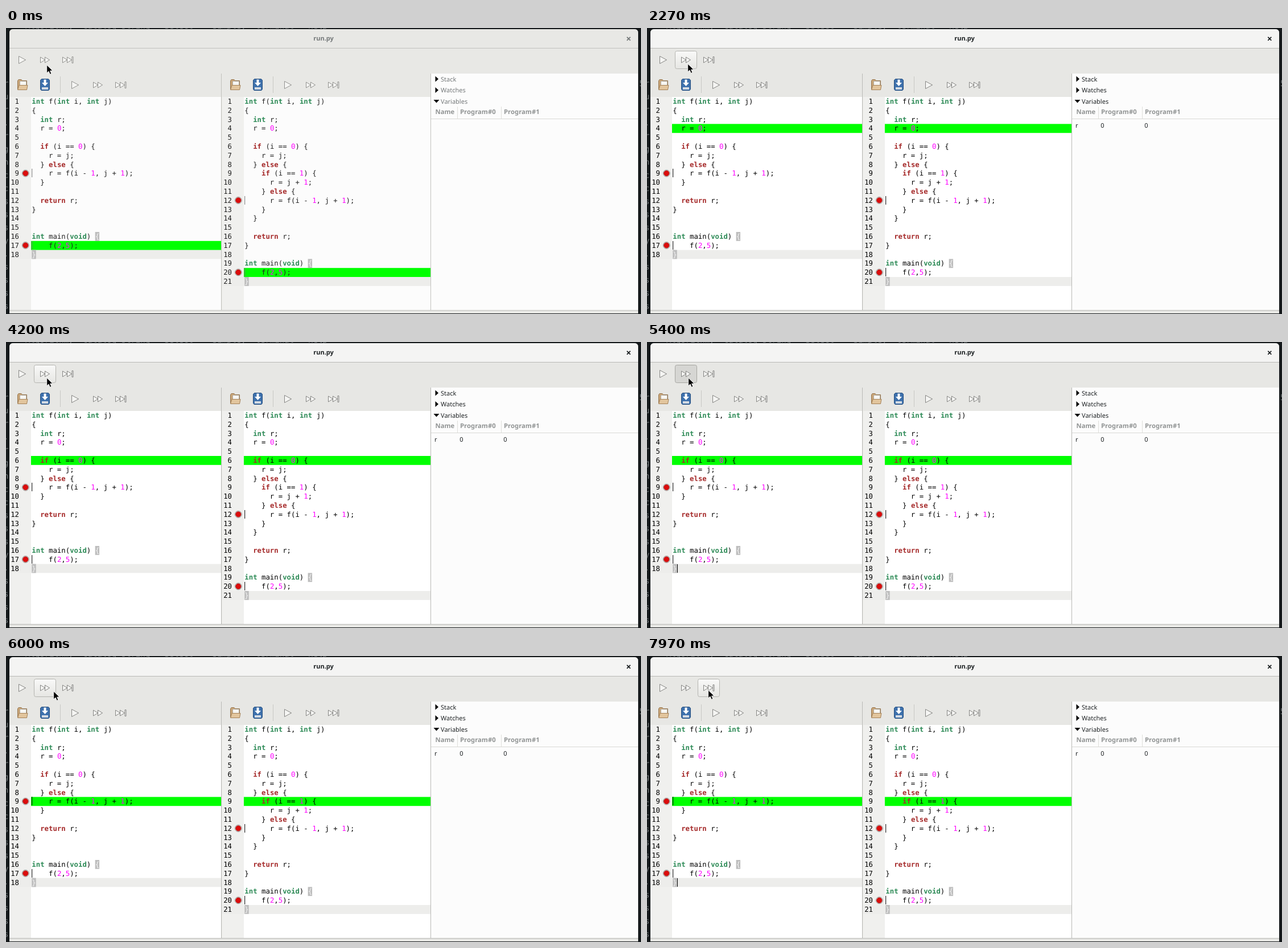
Animation, 1116 px wide and 502 px high, one loop 8000 ms. Source, as an HTML page:

```html
<!DOCTYPE html>
<html lang="en">
<head>
<meta charset="utf-8">
<title>Debugger</title>
<style>
  html, body { margin: 0; width: 100%; height: 100%; overflow: hidden; background: #15191b; }
  svg {
    display: block; width: 1116px; height: 502px;
    --bg: #e7e7e4; --bar: #f4f4f3; --edge: #b9b9b6; --base: #fff; --side: #fcfcfc;
    --fg: #1e2224; --code: #000; --mark: #000; --icon: #858583;
  }
  svg.idle {
    --bg: #e8e8e5; --bar: #e8e8e5; --edge: #c2c2be; --base: #fcfcfc; --side: #fcfcfc;
    --fg: #75797a; --code: #222; --mark: #777; --icon: #92928f;
  }
  text { white-space: pre; text-rendering: geometricPrecision; }
  .ui { font: 11px "Noto Sans", "Open Sans", sans-serif; fill: var(--fg); }
  .b { font-weight: bold; }
  .head { font-size: 11.3px; font-weight: bold; fill: #929595; }
  .code { font: 12.33px "DejaVu Sans Mono", monospace; fill: var(--code); }
  .type { fill: #2e8b57; font-weight: bold; }
  .word { fill: #a52a2a; font-weight: bold; }
  .num { fill: #f0f; }
  .pair { fill: #f4f4f4; }
  .icon { fill: #f5f5f3; stroke: var(--icon); stroke-linejoin: round; }
  .back { font: 14px "DejaVu Sans Mono", monospace; fill: #6e7476; }
</style>
</head>
<body>
<svg id="stage" viewBox="0 0 1116 502"></svg>
<script>
const LOOP = 8000, ROW = 15.8, TOP = 121, CHAR = 7.423, SHIFT = 374;
const stage = document.getElementById('stage');

function add(parent, tag, attrs, text) {
  const el = document.createElementNS('http://www.w3.org/2000/svg', tag);
  for (const key in attrs) el.setAttribute(key, attrs[key]);
  if (text !== undefined) el.textContent = text;
  parent.appendChild(el);
  return el;
}
const rect = (p, x, y, width, height, fill, more) =>
  add(p, 'rect', { x, y, width, height, fill, ...more });
const path = (p, d, attrs) => add(p, 'path', { d, ...attrs });
const label = (p, x, y, text, cls = '', more) =>
  add(p, 'text', { x, y, class: 'ui ' + cls, ...more }, text);
const rowTop = n => TOP + ROW * (n - 1);

// Desktop showing around the window
rect(stage, 0, 0, 1116, 502, '#15191b');
label(stage, 34, 1, 'Algorithm,  catalog string   Select    Simple,  terminal   Help', '', { class: 'back' });
[...'rur.rgnccsssy.sssss'].forEach((c, i) =>
  label(stage, -4, 102 + i * 23, c, '', { class: 'back' }));
label(stage, 1113, 102, '5', '', { class: 'back' });

// Window frame
path(stage, 'M6 501V9Q6 2 13 2H1104Q1111 2 1111 9V501Z', { fill: 'var(--bg)' });
path(stage, 'M6 35V9Q6 2 13 2H1104Q1111 2 1111 9V35Z', { fill: 'var(--bar)' });
rect(stage, 6, 35, 1105, 1, 'var(--edge)');
label(stage, 558, 22, 'run.py', 'b', { 'text-anchor': 'middle' });
path(stage, 'M1091.3 15.8l6 6m0-6l-6 6', { stroke: 'var(--fg)', 'stroke-width': 1.8 });

// Tool buttons
const defs = add(stage, 'defs', {});
const shine = add(defs, 'linearGradient', { id: 'shine', x2: 0, y2: 1 });
add(shine, 'stop', { offset: 0, 'stop-color': '#f9f9f8' });
add(shine, 'stop', { offset: 1, 'stop-color': '#e6e6e3' });
const button = rect(stage, 49.5, 40.5, 38, 31, 'none', { rx: 3 });

function runIcons(p, x, y) {
  const g = add(p, 'g', { class: 'icon', transform: `translate(${x} ${y})` });
  path(g, 'M-5.5-6.5L6.5 0L-5.5 6.5Z');
  path(g, 'M32.5-5L40.5 0L32.5 5ZM40.5-5L48.5 0L40.5 5Z');
  path(g, 'M71.5-5L79.5 0L71.5 5ZM79.5-5L87.5 0L79.5 5ZM88-5.5H90V5.5H88Z');
}
runIcons(stage, 28, 56);

function fileIcons(p) {
  path(p, 'M20.5 107.5V92.5L22 90.5H27L28.5 92.5H36.5V107.5Z', { fill: '#c9a578', stroke: '#96754d' });
  rect(p, 24.5, 93.5, 11, 9, '#f7f6f2', { stroke: '#b5b0a6' });
  path(p, 'M20.5 108.5L23 100.5H38L36.5 108.5Z', { fill: '#e2c59d', stroke: '#a58259' });
  path(p, 'M60.5 91.5L62.5 89.5H74.5L76.5 91.5V107.5L75 109.5H62L60.5 107.5Z',
    { fill: '#3e71ad', stroke: '#28507f' });
  rect(p, 63, 104, 11, 4, '#d4dbe3');
  path(p, 'M66.5 90.5H70.5V96H74L68.5 102L63 96H66.5Z', { fill: '#fff' });
  rect(p, 95, 85, 1, 29, '#c8c8c4');
}

// Editors
const STYLES = [
  ['type', /^(int|void)$/], ['word', /^(if|else|return)$/], ['num', /^\d+$/]
];

function codeLine(p, n, line, pair) {
  const row = add(p, 'text', { x: 45.3, y: rowTop(n) + 12, class: 'code' });
  let col = 0;
  for (const part of line.match(/\w+|[{}]|[^\w{}]+/g) || []) {
    const style = STYLES.find(([, re]) => re.test(part));
    const cls = pair === col ? 'pair' : style ? style[0] : '';
    add(row, 'tspan', { class: cls }, part);
    col += part.length;
  }
}

function editor(x, width, source, stops, open) {
  const g = add(stage, 'g', { transform: `translate(${x} 0)` });
  const lines = source.split('\n'), last = lines.length;
  const wide = width - 38;
  fileIcons(g);
  runIcons(g, 121, 100);
  rect(g, 6, 121, 38, 374, '#f0f0ee');
  rect(g, 44, 121, wide, 374, 'var(--base)');
  rect(g, 6, rowTop(last), width, ROW, '#ededeb');
  const glow = rect(g, 44, 0, wide, ROW, '#0f0');
  rect(g, 45.3 + CHAR * 15, rowTop(open), CHAR, ROW, '#bebebe');
  rect(g, 45.3, rowTop(last), CHAR, ROW, '#bebebe');
  lines.forEach((line, i) => {
    const n = i + 1;
    add(g, 'text', {
      x: 23, y: rowTop(n) + 12, 'text-anchor': 'end',
      class: 'code' + (n === last ? ' b' : '')
    }, n);
    codeLine(g, n, line, n === open ? 15 : n === last ? 0 : -1);
  });
  for (const n of stops) {
    const cy = rowTop(n) + 7.7;
    add(g, 'circle', { cx: 34.3, cy, r: 6, fill: '#d8d4d2', stroke: '#a09a98' });
    add(g, 'circle', { cx: 34.3, cy, r: 4.6, fill: '#dc0c0c', stroke: '#b00808', 'stroke-width': .8 });
    rect(g, 45.2, Math.round(rowTop(n)), 1, 15, 'var(--mark)');
  }
  return glow;
}

const HEAD = `int f(int i, int j)
{
  int r;
  r = 0;

  if (i == 0) {
    r = j;
  } else {
`;
const TAIL = `int main(void) {
    f(2,5);
}`;
const leftCode = HEAD + `    r = f(i - 1, j + 1);
  }

  return r;
}


` + TAIL;
const rightCode = HEAD + `    if (i == 1) {
      r = j + 1;
    } else {
      r = f(i - 1, j + 1);
    }
  }

  return r;
}

` + TAIL;

const leftGlow = editor(0, 372, leftCode, [9, 17], 16);
const rightGlow = editor(SHIFT, 366, rightCode, [12, 20], 19);
const caret = rect(stage, 53, 390, 1, 15, '#000');

// Side panel
rect(stage, 747, 80, 364, 415, 'var(--side)');
for (const x of [378, 746]) rect(stage, x, 80, 1, 415, 'var(--edge)');
rect(stage, 6, 495, 1105, 1, 'var(--edge)');
path(stage, 'M754.5 84.5L760 89.5L754.5 94.5ZM754.5 104L760 109L754.5 114ZM751.5 126H761.5L756.5 131.5Z',
  { fill: '#000' });
['Stack', 'Watches', 'Variables'].forEach((s, i) => label(stage, 764, 93.7 + i * 19.5, s));
[['Name', 754.5], ['Program#0', 798], ['Program#1', 875]].forEach(([s, x]) =>
  label(stage, x, 151.3, s, 'head'));
for (const x of [793, 870]) rect(stage, x, 138, 1, 21, '#dededb');
rect(stage, 747, 159, 364, 1, '#d9d9d6');
const values = add(stage, 'g', {});
[['r', 753], ['0', 797.3], ['0', 874.3]].forEach(([s, x]) => label(values, x, 174.5, s));

const pointer = path(stage, 'M.7 1V15L4 12L6.4 17.3L8.9 16.2L6.6 11.2L11 10.9Z',
  { fill: '#000', stroke: '#fff', 'stroke-width': .9 });

// Timeline: [start, value...]
const GLOW = [[0, 17, 20], [2270, 4, 4], [4200, 6, 6], [6000, 9, 9]];
const CARET = [[0, 0], [1330, 1], [2270, 0], [2670, 1], [4200, 0], [4600, 1],
  [6000, 0], [6400, 1], [7170, 0], [7570, 1]];
const BUTTON = [[0, 'none'], [70, 'hover'], [1330, 'down'], [2270, 'hover'], [2970, 'down'],
  [4200, 'hover'], [4800, 'down'], [6000, 'hover']];
const MOVES = [[0, 71, 64], [329, 71, 64], [330, 71, 62], [5370, 71, 62], [5970, 83, 61],
  [6069, 83, 61], [6170, 101, 58], [6270, 103, 58], [6599, 103, 58], [6600, 104, 58],
  [6769, 104, 58], [6900, 107, 57], [7969, 107, 57], [7970, 107, 59], [LOOP, 107, 59]];
const LOOKS = { none: ['none', 'none'], hover: ['url(#shine)', '#b4b4b0'], down: ['#d6d6d3', '#a6a6a2'] };

const current = (list, t) => list.filter(k => k[0] <= t).pop();

function position(t) {
  const i = MOVES.findIndex(k => k[0] > t);
  const a = MOVES[i - 1], b = MOVES[i], u = (t - a[0]) / (b[0] - a[0]);
  return [1, 2].map(j => Math.round(a[j] + (b[j] - a[j]) * u));
}

function draw(t) {
  const [, l, r] = current(GLOW, t), [x, y] = position(t);
  leftGlow.setAttribute('y', rowTop(l));
  rightGlow.setAttribute('y', rowTop(r));
  stage.setAttribute('class', t < 1330 ? 'idle' : '');
  caret.setAttribute('visibility', current(CARET, t)[1] ? 'visible' : 'hidden');
  values.setAttribute('visibility', t < 2270 ? 'hidden' : 'visible');
  const [fill, stroke] = LOOKS[current(BUTTON, t)[1]];
  button.setAttribute('fill', fill);
  button.setAttribute('stroke', stroke);
  button.setAttribute('x', x < 89 ? 49.5 : 89.5);
  pointer.setAttribute('transform', `translate(${x} ${y})`);
}

const start = performance.now();
function tick() {
  draw((performance.now() - start) % LOOP);
  requestAnimationFrame(tick);
}
tick();
</script>
</body>
</html>
```
